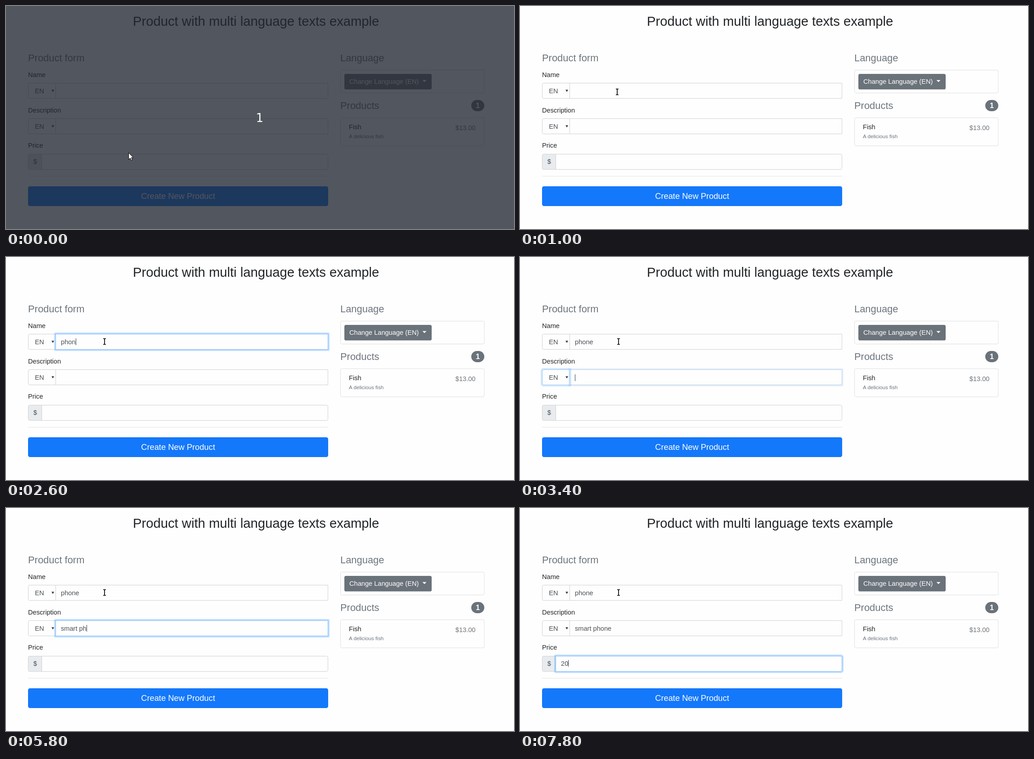
These frames come from a looping animation (1129 px wide and 496 px high, 8 s). An HTML page:

```html
<!DOCTYPE html>
<html lang="en">
<head>
<meta charset="utf-8">
<title>Product form</title>
<style>
  html, body { margin: 0; width: 100%; height: 100%; overflow: hidden; background: #fefefe; }
  svg { display: block; width: 1129px; height: 496px; }
  text { font: 14.62px "Liberation Sans", Arial, sans-serif; fill: #212529; white-space: pre; }
  .title { font-size: 29.23px; text-anchor: middle; }
  .head { font-size: 21.92px; fill: #6c757d; }
  .muted { fill: #6c757d; }
  .small { font-size: 11.7px; }
  .input { fill: #495057; }
  .light { fill: #fff; }
  .line { fill: #fefefe; stroke: #ced0d3; }
  .card { fill: #fefefe; stroke: #dedede; }
  .glow { fill: none; stroke: #007bff; stroke-opacity: .25; stroke-width: 3; }
  .edge { fill: none; stroke: #80bdff; }
</style>
</head>
<body>
<svg id="stage" viewBox="0 0 1129 496">
  <rect width="1129" height="496" fill="#fefefe"/>
  <text class="title" x="555.7" y="44">Product with multi language texts example</text>

  <text class="head" x="49" y="122.5">Product form</text>
  <text x="49" y="158">Name</text>
  <text x="49" y="236.5">Description</text>
  <text x="49" y="315">Price</text>
  <g id="fields"></g>
  <path d="M49 378.5H716" stroke="#e4e4e4"/>
  <rect x="49" y="401" width="667" height="44" rx="4.4" fill="#1478fb"/>
  <text class="light" x="382.5" y="429" text-anchor="middle" style="font-size:18.27px">Create New Product</text>

  <text class="head" x="743" y="122.5">Language</text>
  <rect class="card" x="743.5" y="142.5" width="319.5" height="51" rx="3.2"/>
  <rect x="752" y="151" width="194" height="34.5" rx="3.6" fill="#6a727a"/>
  <text class="light" x="763" y="173">Change Language (EN)</text>
  <path d="M925.5 164.7h9l-4.5 4.5z" fill="#fff"/>

  <text class="head" x="743" y="228.5">Products</text>
  <rect x="1034" y="209" width="29" height="25" rx="12.5" fill="#6a727a"/>
  <text class="light" x="1048.5" y="227" text-anchor="middle" style="font-size:16.4px;font-weight:700">1</text>
  <rect class="card" x="743.5" y="248.5" width="319.5" height="62.5" rx="3.2"/>
  <text x="762" y="274">Fish</text>
  <text class="muted small" x="762" y="293.5">A delicious fish</text>
  <text class="muted" x="1043.5" y="276" text-anchor="end">$13.00</text>

  <g id="focus"></g>
  <rect id="caret" width="1" height="15" fill="#343a40"/>

  <g id="countdown">
    <rect width="1129" height="496" fill="rgb(33,38,48)" opacity=".775"/>
    <text class="light" x="563.8" y="257.5" text-anchor="middle" style="font:26px 'DejaVu Sans',sans-serif">1</text>
  </g>
  <path id="arrow" d="M.5 .5V15.5L4 12.2L6.3 17.2L8.8 16.1L6.5 11.2H10.9Z" fill="#fff" stroke="#000" stroke-linejoin="round"/>
  <g id="beam" fill="none">
    <path d="M-3 -6.5H3M-3 6.5H3M0 -6.5V6.5" stroke="#fff" stroke-width="3.6" stroke-linecap="square"/>
    <path d="M-3 -6.5H-1L0 -5.5L1 -6.5H3M-3 6.5H-1L0 5.5L1 6.5H3M0 -5.5V5.5" stroke="#000" stroke-width="1.7"/>
  </g>
</svg>
<script>
const LOOP = 8000, STEP = 200;
const $ = id => document.getElementById(id);

// Rounded box whose left and right corners have their own radius.
const box = (x, y, w, h, l, r) =>
  `M${x + l} ${y}h${w - l - r}q${r} 0 ${r} ${r}v${h - 2 * r}q0 ${r} ${-r} ${r}` +
  `h${l + r - w}q${-l} 0 ${-l} ${-l}v${2 * l - h}q0 ${-l} ${l} ${-l}z`;

const rows = [
  { x: 110.5, y: 171.5, r: 0, base: 194, caret: 181 },
  { x: 110.5, y: 250.5, r: 0, base: 272.5, caret: 259.5 },
  { x: 79.5, y: 329.5, r: 3.2, base: 351, caret: 338 }
];
const outlines = rows.map(f => box(f.x, f.y, 715.5 - f.x, 34, 0, f.r));
outlines.push(box(49.5, 250.5, 61, 34, 3.2, 0));
const SELECT = 3;

$('fields').innerHTML = rows.map((f, i) => {
  const isPrice = i === 2;
  const lead = `<path class="line" ${isPrice ? 'style="fill:#e9ecef"' : ''} d="${box(49.5, f.y, f.x - 49.5, 34, 3.2, 0)}"/>`;
  const label = isPrice
    ? `<text class="input" x="60.7" y="${f.base}">$</text>`
    : `<text class="input" x="64.2" y="${f.base}">EN</text>
       <path d="M101.2 ${f.y + 14.7}h5.8l-2.9 5z" fill="#343a40"/>`;
  return `${lead}${label}<path class="line" d="${outlines[i]}"/>
    <text class="input value" x="${f.x + 11.5}" y="${f.base}"></text>`;
}).join('');

$('focus').innerHTML = outlines.map((d, i) => {
  const [x, w] = i === SELECT ? [49.5, 61] : [rows[i].x, 715.5 - rows[i].x];
  const y = i === SELECT ? 250.5 : rows[i].y;
  const l = i === SELECT ? 5 : 1.5, r = i === 2 ? 5 : 1.5;
  return `<g><path class="glow" d="${box(x - 2, y - 2, w + 4, 38, l, r)}"/><path class="edge" d="${d}"/></g>`;
}).join('');

const values = [...document.querySelectorAll('.value')];
const rings = [...$('focus').children];

const typing = [
  [[2200, 'p'], [2400, 'ph'], [2600, 'phon'], [2800, 'phone']],
  [[4200, 's'], [4400, 'sm'], [4600, 'sma'], [4800, 'smart'], [5000, 'smart '],
   [5800, 'smart ph'], [6000, 'smart phon'], [6200, 'smart phone']],
  [[7600, '2'], [7800, '20']]
];
// [focus start, full, blur start, gone]
const focusTimes = [[1100, 1200, 3100, 3300], [3300, 3600, 6500, 6800], [6500, 6800, 9000, 9200], [3100, 3200, 3300, 3600]];
const caretOff = [[0, 1200], [1800, 2200], [3200, 3400], [4000, 4200], [7200, 7600]];
const path = [[0, 272, 326], [200, 263, 306], [400, 249, 272], [600, 232, 232], [800, 220, 201], [1000, 216, 191], [1200, 219, 188]];

const ramp = (t, a, b) => Math.min(1, Math.max(0, (t - a) / (b - a)));
const latest = (list, t) => list.filter(e => e[0] <= t).pop();
const show = (el, on) => el.setAttribute('visibility', on ? 'visible' : 'hidden');

function drawPointer(t) {
  const [, x, y] = latest(path, t);
  const overField = rows.some(f => x > f.x && y > f.y && y < f.y + 34);
  for (const [id, on] of [['arrow', !overField], ['beam', overField]]) {
    $(id).setAttribute('transform', `translate(${x} ${y})`);
    show($(id), on);
  }
}

function drawCaret(t) {
  const i = t < 3400 ? 0 : t < 6600 ? 1 : 2;
  const text = values[i].textContent;
  const width = text ? values[i].getComputedTextLength() : 0;
  $('caret').setAttribute('x', Math.round(rows[i].x + 11.5 + width));
  $('caret').setAttribute('y', Math.round(rows[i].caret + (text ? 0 : 1)));
  show($('caret'), !caretOff.some(([a, b]) => t >= a && t < b));
}

function draw(time) {
  const t = Math.floor(time / STEP) * STEP;
  show($('countdown'), t < 200);
  values.forEach((el, i) => { el.textContent = (latest(typing[i], t) || [0, ''])[1]; });
  rings.forEach((el, i) => {
    const [a, b, c, d] = focusTimes[i];
    el.setAttribute('opacity', ramp(t, a, b) * (1 - ramp(t, c, d)));
  });
  drawCaret(t);
  drawPointer(t);
}

const start = performance.now();
function tick() {
  draw((performance.now() - start) % LOOP);
  requestAnimationFrame(tick);
}
tick();
</script>
</body>
</html>
```
